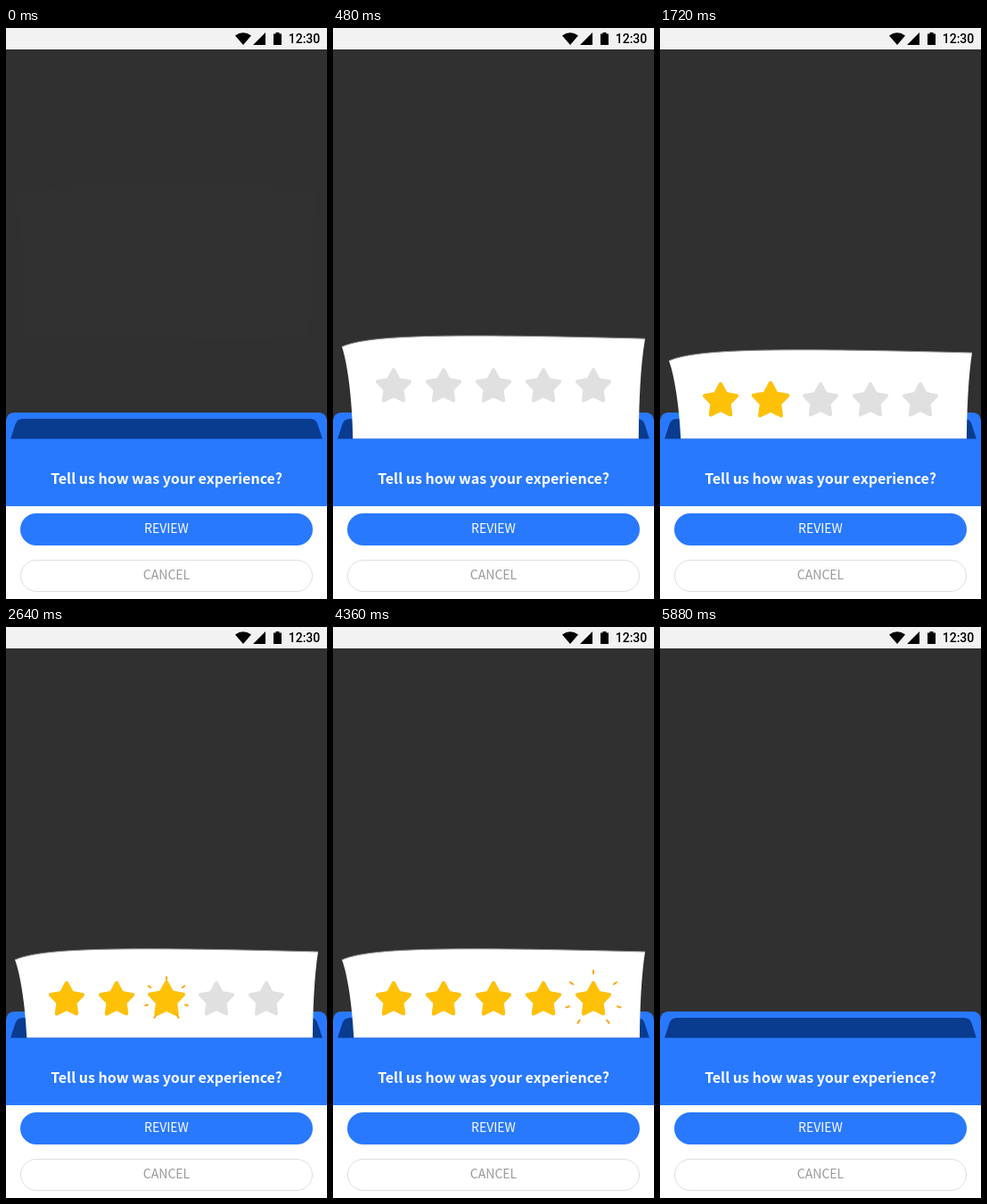
An HTML page that plays this animation: 360x640 px, repeating every 6000 ms.

```html
<!DOCTYPE html>
<html lang="en">
<head>
<meta charset="utf-8">
<title>Rating card</title>
<style>
  html, body { margin: 0; width: 100%; height: 100%; overflow: hidden; background: #303030; }
  svg { display: block; width: 100vw; height: 100vh; }
  text { text-anchor: middle; font-family: "Noto Sans CJK JP", "Noto Sans CJK SC", "Noto Sans CJK", "Noto Sans", sans-serif; }
  .label { font-size: 14px; font-weight: 400; }
  .title { font-size: 16px; font-weight: 700; fill: #fff; }
  .clock { font: 500 14px Roboto, sans-serif; }
  .star { stroke-width: 4; stroke-linejoin: round; }
</style>
</head>
<body>
<svg viewBox="0 0 360 640">
  <defs><clipPath id="aboveSlot"><path d="M0 0H360V460.5H0Z"/></clipPath></defs>
  <rect width="360" height="640" fill="#303030"/>

  <path d="M0 462V440Q1 431 10 431H350Q359 431 360 440V462Z" fill="#2979ff"/>
  <path d="M5 461L10.500 444Q12.500 438 19 438H341Q347.500 438 349.500 444L355 461Z" fill="#093b8e"/>

  <g clip-path="url(#aboveSlot)">
    <g id="card">
      <path id="sheet" fill="#fff"/>
      <path d="M10 373C40 360 120 358 350 364" fill="none" stroke="#8c8c8c"/>
      <g id="stars"></g>
    </g>
  </g>

  <rect y="460.500" width="360" height="76" fill="#2979ff"/>
  <text class="title" x="180" y="511">Tell us how was your experience?</text>
  <rect y="536" width="360" height="104" fill="#fff"/>
  <rect x="16" y="544" width="328" height="36" rx="18" fill="#2979ff"/>
  <text class="label" x="180" y="566" fill="#fff">REVIEW</text>
  <rect x="16.500" y="596.500" width="327" height="35" rx="17.500" fill="#fff" stroke="#dedede"/>
  <text class="label" x="180" y="618" fill="#999">CANCEL</text>

  <rect width="360" height="24" fill="#f2f2f2"/>
  <path d="M257 8.500Q266 2 275 8.500L266 19ZM277 19L291 5V19ZM300 6.500H302.500V5H306.500V6.500H309V19H300Z"/>
  <text class="clock" x="334.500" y="17">12:30</text>
</svg>
<script>
const LOOP = 6000, ENTER = 640, EXIT = 5440, EXIT_TIME = 440;
const FIRST_STAR = 710, STAR_GAP = 750;
const RAYS = [0, 54, 107, 147, -54, -107, -147].map(deg => deg * Math.PI / 180);

const byId = id => document.getElementById(id);
const progress = (t, from, to) => Math.min(1, Math.max(0, (t - from) / (to - from)));
const easeOut = (p, power) => 1 - (1 - p) ** power;

function add(parent, tag, attrs) {
  const node = document.createElementNS("http://www.w3.org/2000/svg", tag);
  for (const key in attrs) node.setAttribute(key, attrs[key]);
  return parent.appendChild(node);
}

const starPoints = Array.from({ length: 10 }, (_, i) => {
  const radius = i % 2 ? 10 : 19, angle = i * Math.PI / 5;
  return [radius * Math.sin(angle), 1 - radius * Math.cos(angle)].map(v => v.toFixed(2));
}).join(" ");

const stars = Array.from({ length: 5 }, (_, i) => {
  const group = add(byId("stars"), "g", { transform: `translate(${68 + 56 * i} 417)` });
  const star = color => add(group, "polygon", { class: "star", points: starPoints, fill: color, stroke: color });
  star("#e0e0e0");
  return {
    fill: star("#ffc107"),
    rays: add(group, "path", { stroke: "#ffa511", "stroke-width": 2, "stroke-linecap": "round" })
  };
});

function sheetPath(shift) {
  const left = 17 + shift, right = 341 + shift * 0.6;
  return `M10 373C40 360 120 358 350 364C${341 + shift * 0.4} 410 ${right} 480 ${right} 537` +
    `L${left} 533C${left + 7} 470 ${17 + shift / 2} 397 10 373Z`;
}

function drawStar({ fill, rays }, age) {
  const scale = 1.08 * easeOut(progress(age, 0, 350), 3) - 0.08 * progress(age, 350, 550);
  fill.setAttribute("visibility", age > 0 ? "visible" : "hidden");
  fill.setAttribute("transform", `scale(${scale})`);

  const head = 22 + 10 * easeOut(progress(age, 400, 600), 2);
  const tail = 22 + 10 * progress(age, 520, 730);
  const at = (angle, r) => `${r * Math.sin(angle)} ${-r * Math.cos(angle)}`;
  rays.setAttribute("d", head > tail ? RAYS.map(a => `M${at(a, tail)}L${at(a, head)}`).join("") : "");
}

function render(t) {
  const enter = progress(t, 0, ENTER), leave = progress(t, EXIT, EXIT + EXIT_TIME);
  const y = -186 * (1 - enter) ** 1.77 + 110 * leave ** 1.8;
  const card = byId("card");
  card.setAttribute("transform", `translate(0 ${y})`);
  card.setAttribute("opacity", leave < 1 ? progress(t, 0, 320) : 0);
  byId("sheet").setAttribute("d", sheetPath(4.5 * enter ** 1.8));
  stars.forEach((star, i) => drawStar(star, t - FIRST_STAR - STAR_GAP * i));
}

const start = performance.now();
function tick() {
  render((performance.now() - start) % LOOP);
  requestAnimationFrame(tick);
}
tick();
</script>
</body>
</html>
```
